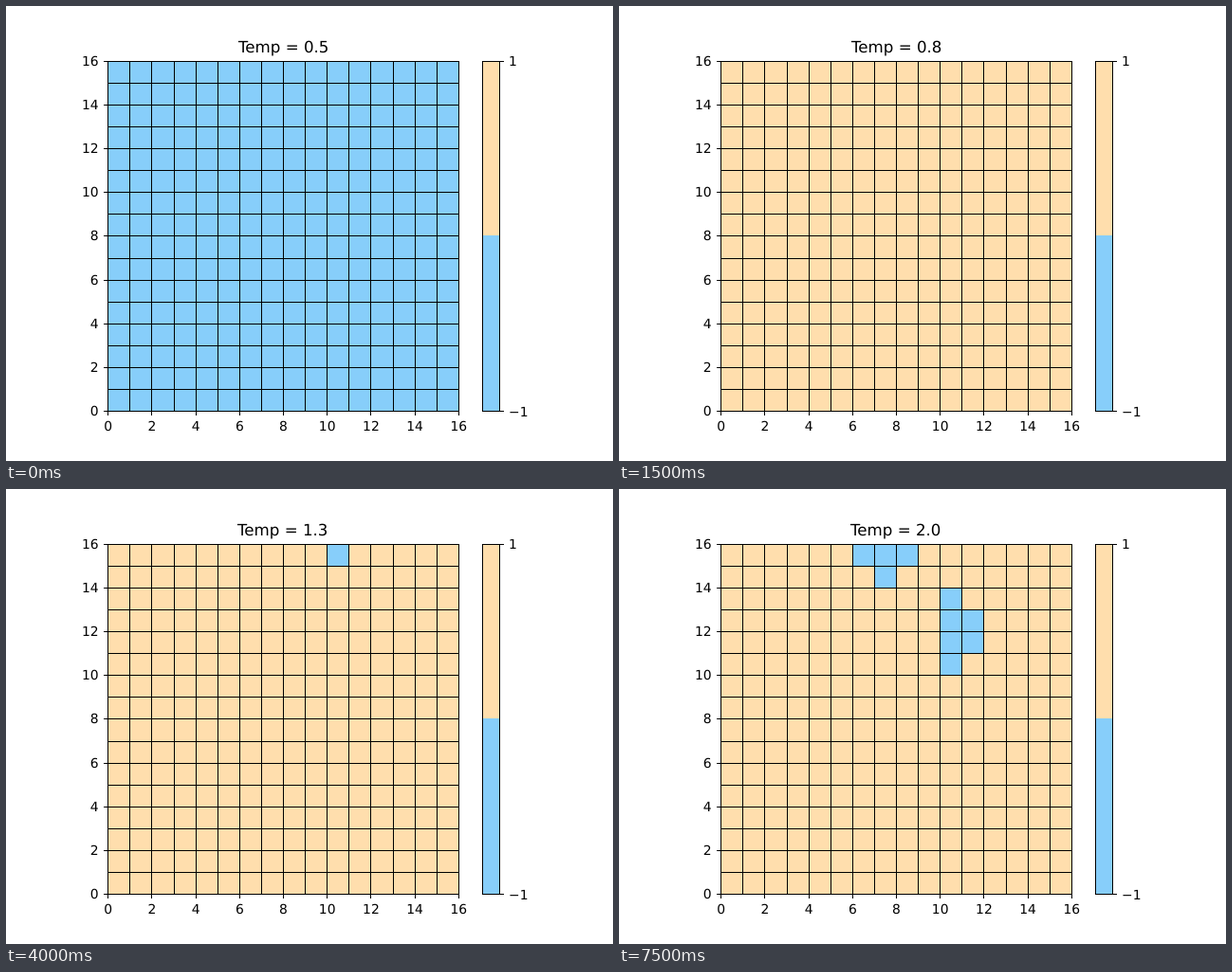
An HTML page with a canvas that plays this animation: 640x480 px, repeating every 8000 ms.

```html
<!DOCTYPE html>
<html lang="en">
<head>
<meta charset="utf-8">
<title>Spin lattice</title>
<style>
html, body { margin: 0; width: 100%; height: 100%; overflow: hidden; background: #fff; }
canvas { display: block; }
</style>
</head>
<body>
<canvas id="stage" width="640" height="480"></canvas>
<script>
const ctx = document.getElementById('stage').getContext('2d');
const DOWN = '#87cefa', UP = '#ffdead', INK = '#000';
const FONT = '"DejaVu Sans", Verdana, sans-serif';
const N = 16, STEP = 500, LOOP = 8000;

// Each state: majority spin, then the [column, row] of the flipped cells.
const states = [
  [DOWN], [UP], [DOWN], [UP], [DOWN], [DOWN], [DOWN],
  [DOWN, [3, 6]],
  [UP, [10, 15]],
  [DOWN],
  [UP, [11, 14], [11, 6]],
  [UP],
  [UP, [5, 5], [12, 10]],
  [DOWN, [2, 15], [3, 15], [15, 15], [0, 9], [4, 1], [7, 1], [2, 0], [3, 0]],
  [UP, [5, 9], [14, 0], [14, 1], [8, 4]],
  [UP, [6, 15], [7, 15], [8, 15], [7, 14], [10, 13], [10, 12], [11, 12], [10, 11], [11, 11], [10, 10]]
];

const gx = i => Math.round(107.2 + 23.1 * i + 0.001);
const gy = j => Math.round(427.2 - 23.1 * j + 0.001);

function box(color, x, y, w, h) {
  ctx.fillStyle = color;
  ctx.fillRect(x, y, w, h);
}

function label(str, x, y, align, size = 13.889) {
  ctx.font = size + 'px ' + FONT;
  ctx.textAlign = align;
  ctx.fillStyle = INK;
  ctx.fillText(str, x, y);
}

function lattice([base, ...flips]) {
  box(base, gx(0), gy(N), gx(N) - gx(0), gy(0) - gy(N));
  const other = base === UP ? DOWN : UP;
  for (const [c, r] of flips) {
    box(other, gx(c), gy(r + 1), gx(c + 1) - gx(c), gy(r) - gy(r + 1));
  }
  for (let i = 0; i <= N; i++) {
    box(INK, gx(i), gy(N), 1, gy(0) - gy(N) + 1);
    box(INK, gx(0), gy(i), gx(N) - gx(0) + 1, 1);
  }
}

function axes() {
  for (let i = 0; i <= N; i += 2) {
    box(INK, gx(i), 428, 1, 4);
    label(i, 107.7 + 23.1 * i, 448, 'center');
    box(INK, 103, gy(i), 4, 1);
    label(i, 97.6, gy(i) + 5, 'right');
  }
}

function colorbar() {
  box(INK, 502, 58, 19, 370);
  box(UP, 503, 59, 17, 183);
  box(DOWN, 503, 242, 17, 185);
  box(INK, 521, 58, 4, 1);
  box(INK, 521, 427, 4, 1);
  label('1', 530, 63, 'left');
  label('\u22121', 530, 433, 'left');
}

function draw(t) {
  const k = Math.floor((t % LOOP) / STEP);
  const temp = 0.5 + k / 10;
  ctx.textRendering = 'geometricPrecision';
  box('#fff', 0, 0, 640, 480);
  lattice(states[k]);
  axes();
  colorbar();
  label('Temp = ' + temp.toFixed(1), temp < 0.95 ? 245 : 244, 49, 'left', 16.667);
}

let start;
function tick(now) {
  start ??= now;
  draw(now - start);
  requestAnimationFrame(tick);
}
draw(0);
requestAnimationFrame(tick);
</script>
</body>
</html>
```
